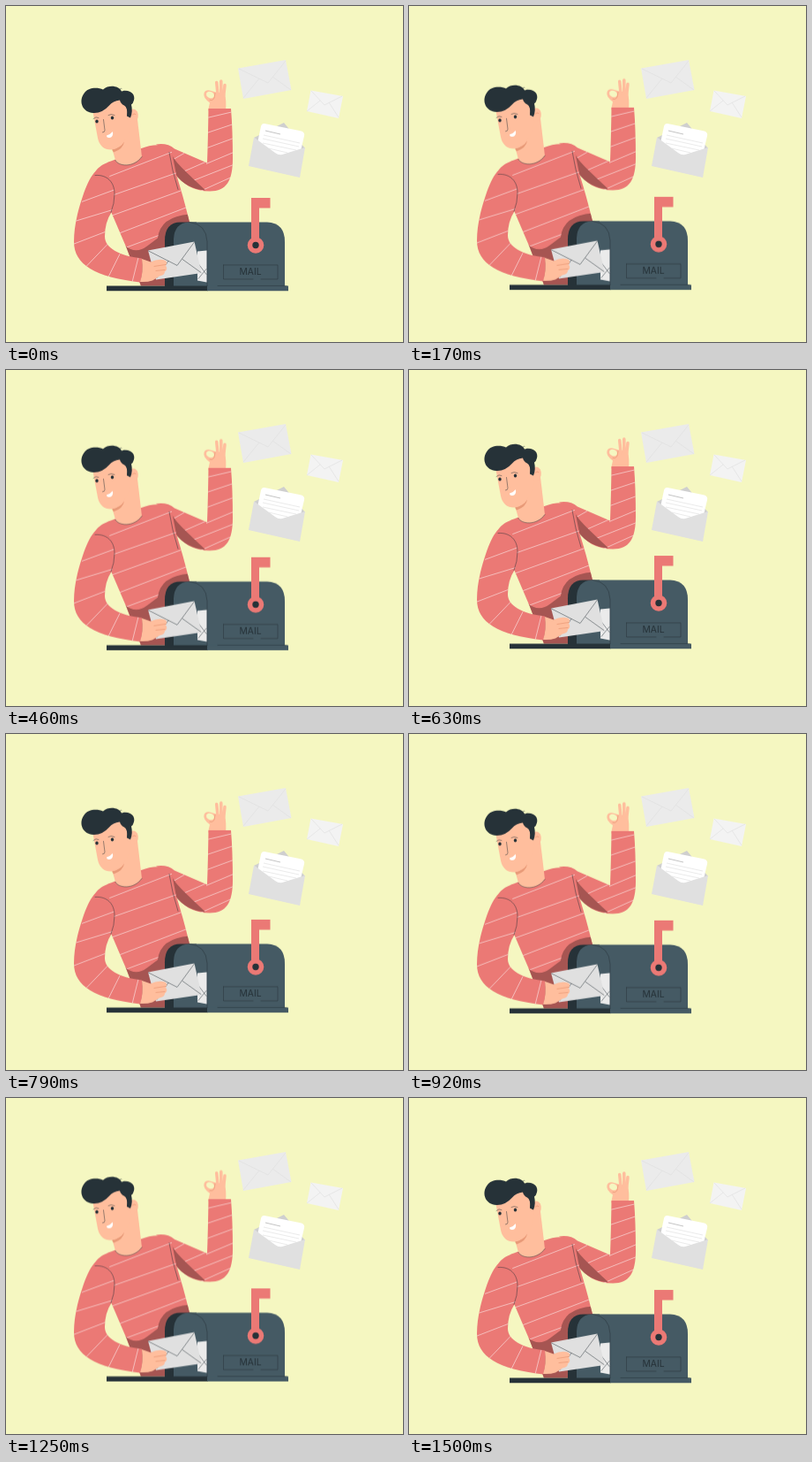
An HTML page without scripts for the animation above (1.54 s loop, 450 px wide and 380 px high).

```html
<!DOCTYPE html>
<html lang="en">
<head>
<meta charset="utf-8">
<title>Mail</title>
<style>
  html, body { margin: 0; width: 100%; height: 100%; overflow: hidden; background: #f5f7c1; }
  svg { display: block; width: 100vw; height: 100vh; }
  .bob { animation: bob .77s cubic-bezier(.37, 0, .63, 1) -.04s infinite alternate; }
  @keyframes bob {
    from { transform: translateY(.5px); }
    to { transform: translateY(-6.8px); }
  }
  .shirt { fill: #eb7975; }
  .shade { fill: #a65552; }
  .skin { fill: #ffbe9d; }
  .dark { fill: #263238; }
  .box { fill: #455a64; }
  .line { fill: none; stroke: #263238; stroke-width: .6; stroke-opacity: .8; stroke-linecap: round; stroke-linejoin: round; }
  .stripe { fill: none; stroke: #fff; stroke-width: .7; stroke-opacity: .75; }
  .crease { fill: none; stroke: #dedede; stroke-width: .6; stroke-linejoin: round; }
  .tone { fill: none; stroke: #e58f6c; stroke-width: .6; stroke-linecap: round; }
  .finger { fill: none; stroke: #ffbe9d; stroke-width: 3.5; stroke-linecap: round; }
  text { font: 10.3px Inter, "Open Sans", sans-serif; fill: #263238; }
</style>
</head>
<body>
<svg viewBox="0 0 450 380" preserveAspectRatio="none">
  <defs>
    <path id="torso" d="M124 173C110 178 98 183 100 197L119 232L137 274L153 316H195V262L208 244Q201 215 193 190L187 160Q172 153 152 161Z"/>
    <path id="raised" d="M170 156Q183 154 191 161L228 177Q229 150 229.500 115.500H255Q257 140 257 172C257 197 250 209 231 209C213 209 199 201 192 188L185 165Z"/>
    <path id="lowered" d="M108 182C96 187 89 206 81 235Q77 252 77 266C77 292 101 306 152 312Q156 301 154 285C128 282 112 273 112 260Q112 244 120 232Q124 217 122 203C119 192 112 184 108 182Z"/>
    <clipPath id="torsoClip"><use href="#torso"/></clipPath>
    <clipPath id="raisedClip"><use href="#raised"/></clipPath>
    <clipPath id="loweredClip"><use href="#lowered"/></clipPath>
  </defs>

  <g id="floating">
    <path fill="#ebebeb" d="M263 70.500L317 61L323.500 95L269 105Z"/>
    <path class="crease" d="M264 71L297 87L317 62M269 104L287 82M323 95L302 80"/>
    <path fill="#f3f3f3" d="M345.500 95.500L382 102L377 127L341 119Z"/>
    <path class="crease" d="M346 96L361 112L381 102M341 119L356 107M377 126L366 109"/>
    <path fill="#cfcfcf" d="M281 149L315 132L339 161L309 172Z"/>
    <path fill="#fff" d="M293 133L335 141.500Q339 143 338 147L334 164L309 171L285 155L289 136Q290 132.500 293 133Z"/>
    <path fill="none" stroke="#c4c4c4" d="M294 141L311 145"/>
    <path fill="none" stroke="#ebebeb" d="M292 146L333 155M291 150L332 159M291 155L329 163M298 161L319 166"/>
    <path fill="#e0e0e0" d="M281 148.500L305 166Q309 169 313 168L339 160L333 194L275 181Z"/>
  </g>

  <g class="bob">
    <g id="man">
      <path class="skin" d="M229 118L231 109Q223 103 224.500 98Q226 94 231 95L238 97L248 98Q250 107 249 118Z"/>
      <path class="finger" d="M240 99L238.700 86M243.800 99V84.500M246.800 100L248 89"/>
      <ellipse cx="231.500" cy="100" rx="4.600" ry="3.600" fill="#f5f7c1" transform="rotate(25 231.500 100)"/>
      <path class="tone" d="M237 98L236 104Q234 107 231 106"/>
      <use href="#raised" class="shirt"/>
      <path class="stripe" clip-path="url(#raisedClip)" d="M228 126L258 119M228 143L258 133M228 160L258 149M227 178L258 165M202 201L258 179M218 210L258 192M194 190L226 176M188 174L202 166"/>
      <path class="shade" d="M186 164C192 178 206 188 226 208Q204 206 192 190Z"/>

      <use href="#torso" class="shirt"/>
      <g clip-path="url(#torsoClip)">
        <path class="stripe" d="M110 195L190 164M114 216L197 187M116 238L205 206M122 259L208 226M130 275L208 246"/>
        <path class="shade" d="M134 270Q147 281 160 271L172 262Q175 237 210 235V318H150Z"/>
      </g>
      <path class="line" d="M185 165Q188 185 195 207"/>

      <path class="skin" d="M119 156L124 174C127 181 145 183 154 170L149 128L144 118L128 138Z"/>
      <path fill="#e89a78" d="M120 162Q130 160 134 153Q133 161 122 165Z"/>
      <path class="line" d="M124 174C127 181 145 183 154 170"/>
      <path class="skin" d="M141 117C146 114 151 119 149.500 126Q148 132 141 132Z"/>
      <path class="skin" d="M98 117L104 149Q107 162 119 162C133 160 140 145 142 131L138 103L110 103Z"/>
      <path class="dark" d="M99 120.500C87 120 82 108 88 99C93 91 104 91.500 110 94C117 88 128 90 131 96C140 93 147 99 145 106Q144 110 142 111Q144 119 141 126L137 124Q138 114 134 112Q130 110 129 106Q121 107 117 112Q109 121 99 120.500Z"/>
      <path class="line" d="M129 95Q129 92 131 93M132 97L134 95"/>
      <path class="line" d="M99 127Q102 124 105 126M116 123Q119 121 123 123"/>
      <ellipse class="dark" cx="103" cy="130" rx="1.700" ry="2"/>
      <ellipse class="dark" cx="120.500" cy="126" rx="1.700" ry="2"/>
      <path class="line" d="M110.500 128L112 140Q112 142.500 109.500 142.500"/>
      <path fill="#fff" d="M114 146Q118 145 121 141.500Q122 148 117 148.500Q114 148.500 114 146Z"/>
      <path class="tone" d="M143 123Q145 120 147 122"/>
    </g>

    <g id="mailbox">
      <path class="dark" d="M180 317V265Q180 244 198 244H216V317Z"/>
      <path class="box" d="M190 317V263Q191 245 207 244H296Q316 245 316 266V317Z"/>
      <path class="line" d="M208 244Q227 246 228 266V317"/>
      <path class="dark" d="M114 316H229V322H114Z"/>
      <path class="box" d="M228 316H320V322H228Z"/>
      <path class="line" d="M240 316H318"/>
      <path class="line" d="M246.500 292.500H308V308.500H289M280 308.500H246.500V292.500"/>
      <text x="264.500" y="304">MAIL</text>
      <path class="shirt" d="M278 216.500H299.500V228H287V266H278Z"/>
      <circle class="shirt" cx="283" cy="270" r="9.300"/>
      <circle class="dark" cx="283" cy="270" r="3.700"/>
    </g>

    <g id="delivery">
      <path fill="#ebebeb" d="M217 277L227.500 276V312L217 310Z"/>
      <path class="line" d="M218 291L227 303M218 308L227 297"/>
      <use href="#lowered" class="shirt"/>
      <path class="stripe" clip-path="url(#loweredClip)" d="M86 221L124 207M78 243L121 230M76 269L115 254M91 294L117 267M115 308L129 280M143 312L150 284"/>
      <path class="line" d="M101 191C115 190 123 199 123 212Q123 223 119 233"/>
      <path fill="#e0e0e0" d="M161 276L213.500 266L221.500 301.500L170 309Z"/>
      <path class="line" d="M161.500 276.500L194 293L213.500 266.500M200 286L221 301M184 288L171 307"/>
      <path class="skin" d="M154 285.500L164 289Q172 285 180 287Q184 289 181 293Q184 297 180 300Q180 304 174 305L166 310Q160 312 152 311.500Q156 300 154 285.500Z"/>
      <path class="tone" d="M168 294L181 292M170 299L180 298"/>
    </g>
  </g>
</svg>
</body>
</html>
```
